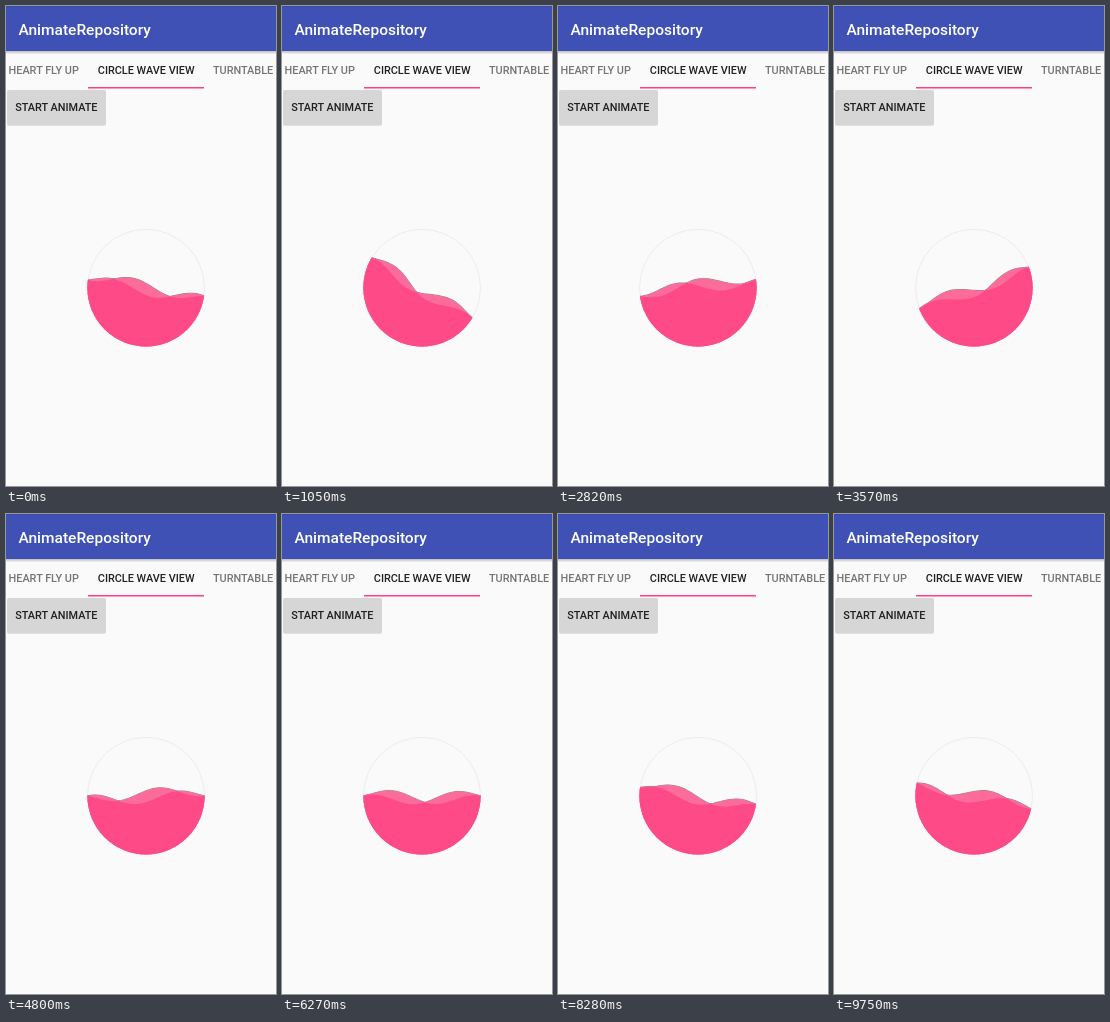
Write an HTML page that moves like this. It is 270 px wide and 480 px high and loops after 9.87 s.

```html
<!DOCTYPE html>
<html lang="en">
<head>
<meta charset="utf-8">
<style>
  html, body { margin: 0; width: 100%; height: 100%; overflow: hidden; background: #fafafa; }
  svg { display: block; width: 270px; height: 480px; }
  text { font: 500 10.88px Roboto, sans-serif; fill: #212121; }
  .title { font-size: 15.5px; fill: #fff; }
  .idle { fill: #757575; }
  .edge { fill: none; stroke: #8d8588; }
  .single { fill: #fc6c9b; }
  .both { fill: #fe4a86; }
</style>
</head>
<body>
<svg viewBox="0 0 270 480">
  <defs>
    <linearGradient id="shade" x2="0" y2="1">
      <stop stop-color="#000" stop-opacity=".24"/>
      <stop offset="1" stop-color="#000" stop-opacity="0"/>
    </linearGradient>
    <path id="waveA"/>
    <path id="waveB"/>
    <clipPath id="disc"><circle r="58.6"/></clipPath>
    <clipPath id="underA"><use href="#waveA"/></clipPath>
  </defs>

  <rect width="270" height="480" fill="#fafafa"/>
  <rect y="45" width="270" height="3.5" fill="url(#shade)"/>
  <rect width="270" height="45" fill="#3f51b5"/>
  <rect width="270" height="1" fill="#384aa9"/>
  <text class="title" x="12.5" y="29.3">AnimateRepository</text>

  <text class="idle" x="2.5" y="68">HEART FLY UP</text>
  <text x="91.8" y="68">CIRCLE WAVE VIEW</text>
  <text class="idle" x="207" y="68">TURNTABLE</text>
  <rect x="82" y="81" width="116" height="1.5" fill="#ff4081"/>

  <rect x="1" y="85" width="99" height="35" rx="2" fill="#000" opacity=".1"/>
  <rect x="1" y="84" width="99" height="35" rx="2" fill="#d6d6d6"/>
  <text x="9.2" y="105.4">START ANIMATE</text>

  <g transform="translate(140 281.8)">
    <circle r="58.5" fill="none" stroke="#e9e9e9" stroke-width=".8"/>
    <g clip-path="url(#disc)">
      <g id="water">
        <use href="#waveA" class="edge"/>
        <use href="#waveB" class="edge"/>
        <use href="#waveA" class="single"/>
        <use href="#waveB" class="single"/>
        <use href="#waveB" class="both" clip-path="url(#underA)"/>
      </g>
    </g>
  </g>
</svg>
<script>
const LOOP = 9870, R = 58.6, AMP = 8.7, HALF_GAP = .115;
const $ = id => document.getElementById(id);

// [time, value] keys: tilt in degrees, phase in cycles
const TILT = [[-700, 0], [1550, 35], [2070, 32], [3300, -28], [4100, 0], [8100, 0], [8400, 12.7], [LOOP, 12.7]];
const PHASE = [[0, -.285], [2070, 1.225], [3570, 2.585], [4800, 3.265], [6270, 4.525], [7530, 5.95], [9030, 7.275]];

const linear = p => p;
const smooth = p => (1 - Math.cos(Math.PI * p)) / 2;

function sample(keys, t, ease) {
  const i = keys.findIndex(key => key[0] > t);
  if (i < 0) return keys[keys.length - 1][1];
  const [t0, v0] = keys[i - 1], [t1, v1] = keys[i];
  return v0 + (v1 - v0) * ease((t - t0) / (t1 - t0));
}

// A travelling wave, one disc wide, whose height fades to zero at the rim
function wave(phase) {
  let d = "M-70 70V0";
  for (let u = -1; u <= 1.001; u += .04) {
    const y = -AMP * (1 - u * u) * Math.cos(2 * Math.PI * (u / 2 - phase));
    d += `L${(u * R).toFixed(2)} ${y.toFixed(2)}`;
  }
  return d + "L70 0V70Z";
}

function held(t) {
  if (t < 8400) return t;
  return t < 8880 ? 8400 : t < 9030 ? 8880 : 9030;
}

function draw(now) {
  const t = held(now % LOOP), phase = sample(PHASE, t, linear);
  $("waveA").setAttribute("d", wave(phase - HALF_GAP));
  $("waveB").setAttribute("d", wave(phase + HALF_GAP));
  $("water").setAttribute("transform", `rotate(${sample(TILT, t, smooth)})`);
}

const start = performance.now();
function tick() {
  draw(performance.now() - start);
  requestAnimationFrame(tick);
}
tick();
</script>
</body>
</html>
```
